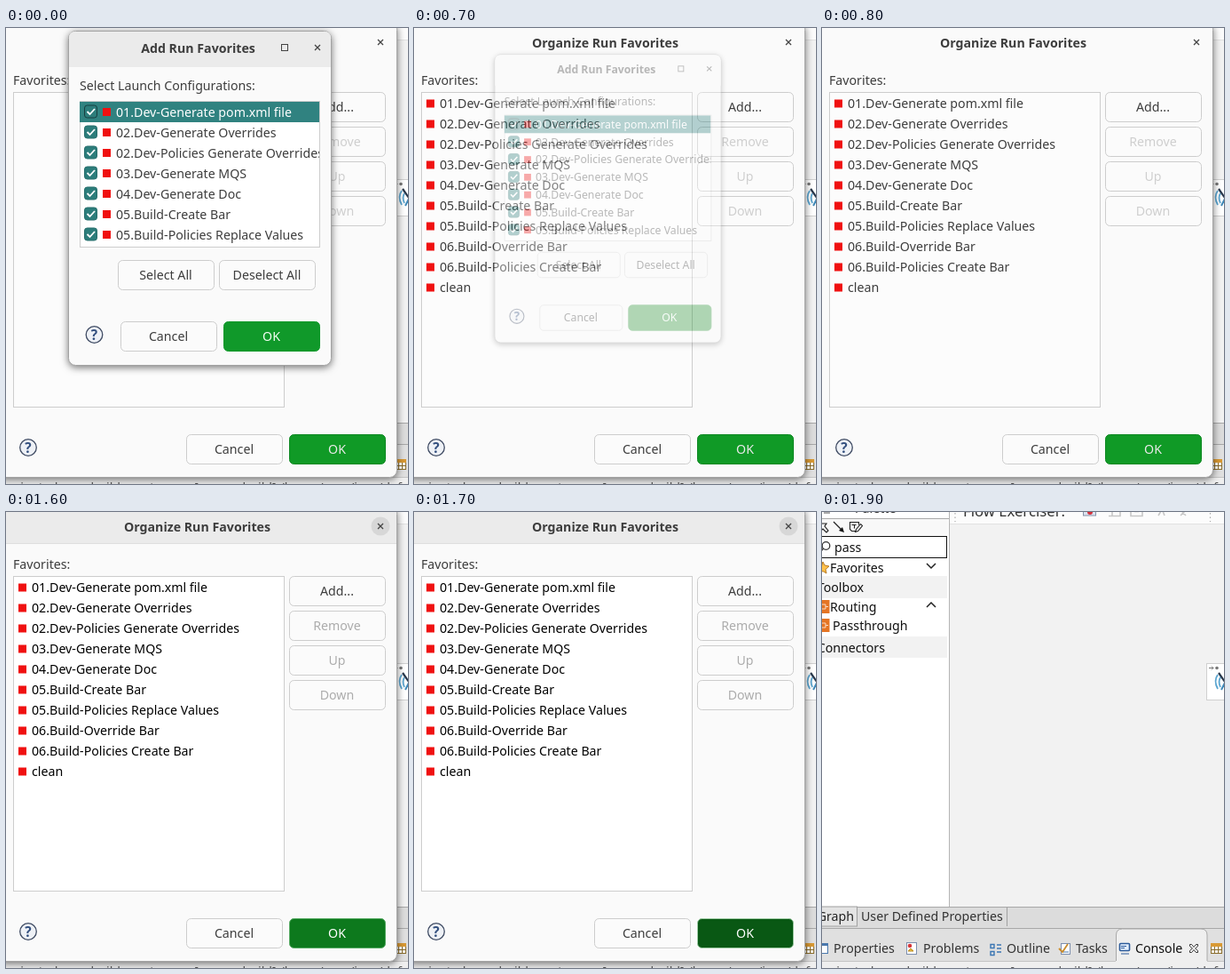
Recreate the animation shown at these times as an HTML page. Size 453 by 513 pixels, loop 3.8 s.

```html
<!DOCTYPE html>
<html lang="en">
<head>
<meta charset="utf-8">
<title>Run favorites</title>
<style>
html, body { margin: 0; width: 100%; height: 100%; overflow: hidden; background: #f2f2f2; }
svg { display: block; }
text { font: 14.2px "Noto Sans", "Open Sans", sans-serif; white-space: pre; }
.bold { font-weight: 700; }
.window { filter: drop-shadow(0 2px 4px #0008); }
</style>
</head>
<body>
<svg id="stage" width="453" height="513" viewBox="0 0 453 513"></svg>
<script>
const LOOP = 3800;
const ITEMS = ['01.Dev-Generate pom.xml file', '02.Dev-Generate Overrides',
  '02.Dev-Policies Generate Overrides', '03.Dev-Generate MQS', '04.Dev-Generate Doc',
  '05.Build-Create Bar', '05.Build-Policies Replace Values', '06.Build-Override Bar',
  '06.Build-Policies Create Bar', 'clean'];

const rect = (x, y, w, h, fill, stroke = 'none', r = 0, extra = '') =>
  `<rect x="${x}" y="${y}" width="${w}" height="${h}" rx="${r}" fill="${fill}" stroke="${stroke}" ${extra}/>`;
const text = (x, y, s, fill = '#3d3d3d', anchor = 'start', extra = '') =>
  `<text x="${x}" y="${y}" fill="${fill}" text-anchor="${anchor}" ${extra}>${s}</text>`;
const path = (d, stroke, width = 1, fill = 'none', extra = '') =>
  `<path d="${d}" stroke="${stroke}" stroke-width="${width}" fill="${fill}" ${extra}/>`;
const circle = (x, y, r, fill, stroke = 'none', width = 1) =>
  `<circle cx="${x}" cy="${y}" r="${r}" fill="${fill}" stroke="${stroke}" stroke-width="${width}"/>`;

// Blend two RGB triples
const mix = (a, b, k) => `rgb(${a.map((v, i) => Math.round(v + (b[i] - v) * k))})`;
const gray = (a, b, k) => mix([a, a, a], [b, b, b], k);

const button = (x, y, label, color, fill = '#fbfbfb', border = '#cdcdcd') =>
  rect(x + .5, y + .5, 108, 33, fill, border, 5) + text(x + 54, y + 22, label, color, 'middle');
const cross = (x, y) => path(`M${x - 3} ${y - 3}l6 6m0-6l-6 6`, '#444', 1.3);
const help = (x, y) => circle(x, y, 9.3, '#eef1f6', '#3f4b63', 1.3) +
  text(x, y + 5.5, '?', '#34507f', 'middle', 'class="bold" style="font-size:15.5px"');
const marker = (x, y) => rect(x + 3, y - 4.5, 9, 9, '#f01010');

// Title bar and body of a window
const frame = (x, y, w, h, bar, barFill) =>
  rect(x + .5, y + .5, w, h, '#fafafa', '#a2a2a2', 8, 'class="window"') +
  path(`M${x + 1} ${bar}V${y + 8}q0-7 7-7H${x + w - 7}q7 0 7 7V${bar}z`, 'none', 0, barFill);

// Group shrinking towards its middle while it fades
const closing = (content, x, y, on) => on
  ? `<g opacity=".35" transform="translate(${x} ${y}) scale(.862) translate(${-x} ${-y})">${content}</g>`
  : content;

function palette() {
  const chevron = (y, dy) => path(`M118 ${y}l5 ${dy}l5 ${-dy}`, '#222', 1.5);
  const tile = y => rect(-6, y, 14.5, 15, '#e57524') +
    path(`M0 ${y + 5}h4v5h-4m4-2.5h3`, '#fbdcc4');
  return rect(0, 0, 143, 444, '#fff') + rect(0, 8, 142, 19, '#f8f8f8') +
    text(37, 1, 'Palette', '#333') + path('M2 1h7', '#555') + path('M0 7.5h143', '#aaa') +
    path('M-2 13h7l-2 3l4 5l-2 2l-4-4l-3 3', '#222', 1.2) +
    path('M13 11l9 9', '#222', 1.3) + path('M25 23l-6-2l4-4z', 'none', 0, '#111') +
    path('M38 21.5h-4.5l-2-2v-8h10v3m-8 0h5m-2 0v4m1 4l1-3l5-6l2 2l-5 6z', '#222', 1.1) +
    rect(-3, 27.5, 143.5, 24, '#fff', '#111') +
    circle(4.5, 38, 4.3, 'none', '#333', 1.3) + path('M1.5 41l-4 5', '#333', 1.5) +
    text(14, 45, 'pass', '#111') +
    path('M1 56l2 4l5 1l-4 3.5l1 4.5l-4-2.5l-4 2.5z', '#b87a22', 1, '#ffc14a') +
    text(9, 68, 'Favorites', '#111') + chevron(58, 5) +
    rect(0, 72, 141, 25, '#f2f2f2') + text(47, 90, 'Toolbox', '#111', 'end') +
    tile(99) + text(9, 112, 'Routing', '#111') + chevron(107, -5) +
    tile(120) + text(12, 133, 'Passthrough', '#111') +
    rect(0, 140, 141, 24, '#f2f2f2') + text(71, 158, 'Connectors', '#111', 'end') +
    path('M143.5 0V444', '#b4b4b4');
}

function toolbar() {
  const dots = x => path(`M${x} 1v10`, '#aaa', 1.2, 'none', 'stroke-dasharray="1.5 3"');
  return rect(144, 0, 309, 13, '#fcfcfc') + path('M144 13.5H453', '#e2e2e2') +
    dots(150) + dots(437.5) +
    text(159, 4.5, 'Flow Exerciser:', '#333', 'start', 'style="font-size:16.7px"') +
    rect(294.5, -4, 14, 8, '#dce3ef', '#8792a8') + circle(302, 0, 3, '#d52f3a') +
    path('M323 4.5h13v-6m-9 0v6m21-6v6h13v-6m-9 1h5M379 4l3-5m2 0l2 5m18 0l5-5m1 5l-4-4', '#c7c7c7', 1.6);
}

function flowNode() {
  return rect(433.5, 170.5, 30, 41, '#fff', '#d0d0d0') +
    path('M436 175.5h5m-2-2l2 2l-2 2', '#777') + circle(445, 175.5, 1.8, '#777') +
    path('M446 183q-5 7 0 16m3-13q-3 5 0 11', '#5aa5d0', 1.8) +
    path('M447 181l7 10', '#27364a', 2.2) + path('M450 200l4-8', '#3d87b8', 2);
}

function bottomTabs() {
  const tab = (x, s) => text(x, 496, s, '#333');
  const page = (x, color) => rect(x + .5, 485.5, 11, 11, '#fff', color) + rect(x, 485, 12, 3, color);
  return rect(0, 444, 453, 24, '#dcdcdc') + path('M0 444.5H453', '#a8a8a8') +
    rect(-5, 444, 44.5, 22, '#e4e4e4', '#a0a0a0') + text(36, 460, 'Graph', '#222', 'end') +
    text(44, 460, 'User Defined Properties', '#333') + path('M208.5 445V466', '#a0a0a0') +
    rect(0, 468, 453, 45, '#e0e0e0') + path('M0 468.5H453', '#a8a8a8') +
    page(-5, '#4a78ad') + tab(13, 'Properties') +
    rect(95.5, 484.5, 11, 13, '#fff', '#7d8fae') + circle(99, 488, 2.3, '#d5363c') +
    path('M97 494l3-3l3 3z', '#b58a20', 1, '#f1bf42') + tab(114, 'Problems') +
    path('M190 486.5h4v4h-4zm0 8h4v4h-4zM197 487h5m-5 4h5m-5 4h5', '#3b76b3', 1.4) + tab(208, 'Outline') +
    rect(269.5, 485.5, 10, 12, '#fff', '#7d8fae') + path('M267 491l4 4l6-9', '#c98b2b', 1.8) +
    path('M272 495h6', '#4a78ad') + tab(286, 'Tasks') +
    path('M331.5 506V476q0-7 7-7H427q7 0 7 7V506', '#a8a8a8', 1, '#efefef') +
    rect(335.5, 485.5, 11, 8, '#e4f0ff', '#2d5b9a', 1, 'stroke-width="1.6"') +
    path('M337 488.5h6m-6 2h4M337 497h9', '#2d5b9a') + text(353, 496, 'Console', '#111') +
    path('M414.5 486.5h2l2.5 3l2.5-3h2v2l-3 2.5l3 2.5v2h-2l-2.5-3l-2.5 3h-2v-2l3-2.5l-3-2.5z', '#333', 1, '#fff') +
    rect(438.5, 485.5, 12, 11, '#fff', '#8a6d2c') + rect(438, 485, 13, 4, '#d99a35') +
    path('M439 492.5h11M442.5 489v8m4-8v8', '#8a6d2c') +
    rect(0, 505, 453, 8, '#efefef') + path('M0 505.5H331M434 505.5H453', '#c4c4c4') +
    text(-24, 521.5, '&lt;terminated&gt; my-build-create-mqs [maven-build] /home/user/java/default/bin', '#555');
}

// k: 0 = in the background, 1 = focused; pressed: OK held down
function organizer(filled, k, pressed) {
  const ink = '#3d3d3d', listInk = gray(61, 0, k), off = gray(207, 172, k);
  const green = mix([16, 154, 38], [9, 88, 20], pressed);
  return frame(-10, -6, 450, 511, 35, gray(250, 235, k)) +
    path('M0 35.5H440', gray(250, 222, k)) +
    text(215.5, 22, 'Organize Run Favorites', ink, 'middle', 'class="bold"') +
    circle(422, 16, 10.5, gray(250, 215, k)) + cross(422, 16) +
    text(8, 64, 'Favorites:', ink) +
    rect(8.5, 72.5, 305, 354, gray(252, 255, k), '#cdcdcd') +
    (filled ? ITEMS.map((s, i) => marker(11, 85 + 23 * i) + text(29, 90 + 23 * i, s, listInk)).join('') : '') +
    ['Add...', 'Remove', 'Up', 'Down'].map((s, i) => button(319, 72 + 39 * i, s, i ? off : ink)).join('') +
    help(25, 472) + button(203, 457, 'Cancel', ink) +
    button(319, 457, 'OK', gray(235, 255, k), green, mix([14, 136, 34], [160, 205, 166], pressed));
}

function chooser(focused, okFill) {
  const ink = '#3d3d3d';
  const row = (s, i) => {
    const y = 94.5 + 23 * i;
    return (i ? '' : rect(83, 83, 270, 23, '#308280')) +
      rect(88.5, y - 7.5, 14, 14, '#2c7d7b', i ? '#276e6c' : '#173f40', 3) +
      path(`M91.5 ${y - .5}l3 3l5.5-6`, '#fff', 1.8) +
      marker(106, y) + text(124, y + 5, s, i ? ink : '#fff');
  };
  return frame(70, 3, 296, 376, 44, focused ? '#ebebeb' : '#fafafa') +
    text(216.5, 27.5, 'Add Run Favorites', ink, 'middle', 'class="bold"') +
    rect(310.5, 18.5, 7, 7, 'none', '#444') + cross(351, 22) +
    text(83, 70, 'Select Launch Configurations:', ink) +
    rect(83.5, 82.5, 270, 164, '#fff', '#cdcdcd') +
    `<svg x="83" y="82" width="270" height="164" viewBox="83 82 270 164">${ITEMS.slice(0, 7).map(row).join('')}</svg>` +
    button(126, 261, 'Select All', ink) + button(240, 261, 'Deselect All', ink) +
    help(99.5, 345) + button(129, 330, 'Cancel', ink) +
    button(245, 330, 'OK', '#f4fff4', okFill, okFill);
}

const desktop = palette() + toolbar() + flowNode() + bottomTabs();

function scene(t) {
  let out = rect(0, 0, 453, 513, '#f2f2f2') + desktop;
  if (t < 1900) {
    const k = Math.min(1, Math.max(0, (t - 1400) / 200));
    const pressed = Math.min(1, Math.max(0, (t - 1500) / 200));
    out += closing(organizer(t >= 700, k, pressed), 215.5, 250, t >= 1800);
  }
  if (t < 800)
    out += closing(chooser(t < 700, t < 500 ? '#10992a' : '#249232'), 218.5, 195, t >= 700);
  return out;
}

const stage = document.getElementById('stage');
let shown = -1;
function tick(now) {
  const t = Math.floor(now % LOOP / 100) * 100;
  if (t !== shown) stage.innerHTML = scene(shown = t);
  requestAnimationFrame(tick);
}
tick(performance.now());
</script>
</body>
</html>
```
